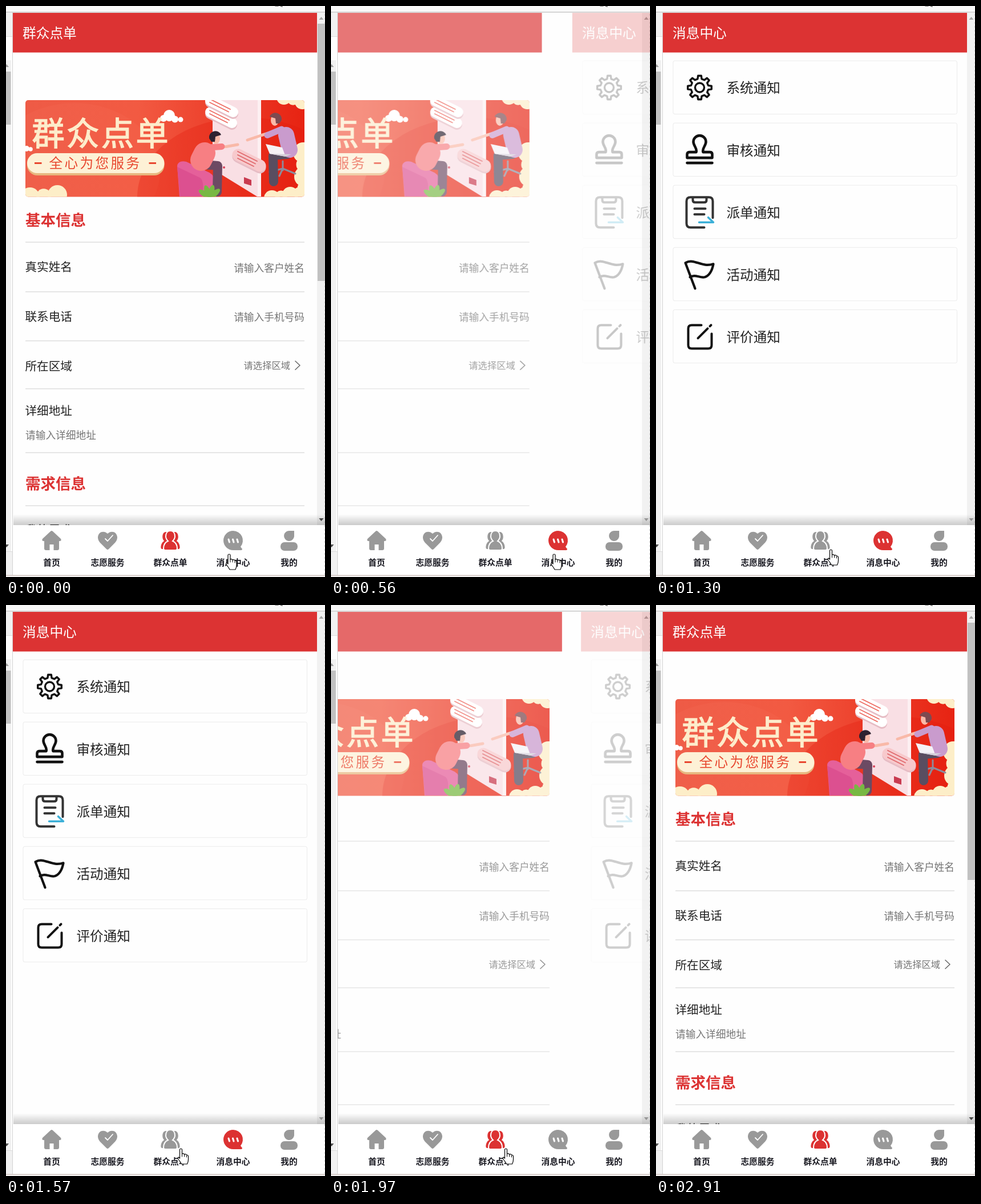
Recreate the animation shown at these times as an HTML page. Size 559 px wide and 1001 px high, loop 3610 ms.

```html
<!DOCTYPE html>
<html lang="zh-CN">
<head>
<meta charset="utf-8">
<title>群众点单</title>
<style>
html, body { margin: 0; width: 100%; height: 100%; overflow: hidden; background: #fff; }
svg { display: block; width: 559px; height: 1001px; font-family: "Noto Sans CJK SC", "Noto Sans CJK", "Noto Sans", sans-serif; }
.line { fill: none; stroke-linecap: round; stroke-linejoin: round; }
.tab { fill: #999; }
.tab.on { fill: #dc3232; }
</style>
</head>
<body>
<svg id="stage" viewBox="0 0 559 1001"></svg>
<script>
const RED = '#dc3333', CREAM = '#fdeec8', SKIN = '#f9b9a8', INK = '#111';

// Text placed by the vertical centre of its glyphs
const text = (x, cy, size, str, fill, extra = '') =>
  `<text x="${x}" y="${(cy + size * .38).toFixed(2)}" font-size="${size}" fill="${fill}" ${extra}>${str}</text>`;
const rect = (x, y, w, h, fill, extra = '') =>
  `<rect x="${x}" y="${y}" width="${w}" height="${h}" fill="${fill}" ${extra}/>`;
const oval = (x, y, rx, ry, fill, extra = '') =>
  `<ellipse cx="${x}" cy="${y}" rx="${rx}" ry="${ry}" fill="${fill}" ${extra}/>`;
const path = (d, fill = 'inherit', extra = '') => `<path d="${d}" fill="${fill}" ${extra}/>`;
const line = (d, color, width, extra = '') =>
  `<path class="line" d="${d}" stroke="${color}" stroke-width="${width}" ${extra}/>`;
const at = (x, y, body, scale = '1') => `<g transform="translate(${x} ${y}) scale(${scale})">${body}</g>`;
const repeat = (n, fn) => Array.from({ length: n }, (_, i) => fn(i)).join('');
const header = title => rect(12, 12, 533, 69.5, RED) + text(29, 47, 23.7, title, '#fff');

// A row of n puffs from (x, y), each stepping by (dx, dy)
const cloud = (x, y, n, dx, dy, r, fill = CREAM) =>
  repeat(n, i => oval(x + i * dx, y + i * dy, r - i % 2 * r / 4, r - i % 2 * r / 4, fill));

// Slanted speech bubble with lines of writing
const bubble = (x, y, len, width, fill, ink, rows) =>
  line(`M${x} ${y + 3}l${len} ${len / 2}`, '#e6bcc4', width) +
  line(`M${x} ${y}l${len} ${len / 2}`, fill, width) +
  repeat(rows, i => line(`M${x - 1} ${y + (i - (rows - 1) / 2) * 6}l${len - 4 - i * 3} ${(len - 4 - i * 3) / 2}`, ink, 1.8));

// Seated figure facing right, origin at the head; (hx, hy) is the reaching hand
const figure = (hx, hy, girth, drop, shirt, legs, hair) =>
  line(`M-20 ${44 + drop}L5 ${46 + drop}L4 ${92 + drop}`, legs, 16) +
  line(`M-18 28L-24 ${36 + drop}`, shirt, girth) +
  line(`M-10 18L${hx / 2} ${hy / 2 + 10}L${hx} ${hy}`, SKIN, 5) +
  line(`M-10 18L${hx * .3} ${hy / 2 + 10}`, shirt, 11) +
  oval(2, 2, 7, 10, SKIN) + path('M-10 2A11 11 0 0 1 11-4L1-1 0 8-6 8Z', hair);

const wall = path('M362 165H447V334H440L362 286Z', '#f9dfe4') + rect(441, 165, 6, 169, '#fdf0f2') +
  bubble(358, 186, 38, 18, '#fff', '#ee6a60', 2) + bubble(358, 166, 40, 18, '#fff', '#ee6a60', 2) +
  bubble(407, 261, 38, 21, '#f7c9cc', '#e0676b', 3) +
  path('M417 300l13 5v10l-13-4Z', '#c93b50') + repeat(3, i => oval(372 + i * 5, 279 + i * 2, 2, 2, '#d9435a'));

const chair = path('M300 280Q302 270 316 273L352 290Q364 294 364 304V327L357 334H304Z', '#e5609a') +
  path('M300 282L340 301Q348 306 344 334H305Z', '#dc5090');
const plant = repeat(4, i => oval(0, -10, 5, 13, '#78b843', `transform="translate(357 336) rotate(${i * 35 - 55})"`));
const stool = line('M494 262Q506 262 502 232M485 272V288M462 291L485 285L507 294M485 285L479 298', '#8d8b9a', 3);
const laptop = path('M455 242l29 6 6 16-28-5Z', '#f5f2f6') + path('M462 259l28 5 10-4Z', '#d6d0da');

const banner = `<g clip-path="url(#card)">
  ${rect(34, 165, 489, 170, 'url(#warm)')}
  ${oval(120, 290, 150, 120, '#ff8f70', 'opacity=".08"')}${oval(420, 335, 190, 140, '#e01a0a', 'opacity=".3"')}
  ${cloud(487, 160, 3, 16, 4, 13)}${cloud(521, 257, 4, 1, 21, 18)}${cloud(466, 337, 4, 16, -3, 14)}${cloud(42, 335, 3, 24, -2, 17)}
  ${cloud(276, 197, 4, 10, .7, 6, '#fff')}${oval(286, 192, 10, 10, '#fff')}${cloud(36, 250, 2, 7, 1, 5, '#fff')}
  ${wall}${chair}${at(366, 230, figure(40, 13, 38, 4, '#f77f83', '#6c4a63', '#2e2230'))}${plant}
  ${stool}${at(473, 198, figure(50, 37, 28, 18, '#c99bcd', '#594d60', '#7d4a50'), '-1 1')}${laptop}
  ${text(45.5, 222, 57, '群众点单', '#fdeccb', 'letter-spacing="3.7" stroke="#fdeccb" stroke-width="1.5"')}
  ${rect(37, 260, 240.5, 37, '#e7b77f', 'rx="18"')}${rect(37, 258, 240.5, 35, '#fdf1d6', 'rx="17.5"')}
  ${[50, 250.5].map(x => rect(x, 274, 12.5, 3, '#e8472f')).join('')}
  ${text(75.5, 275, 23.6, '全心为您服务', '#e8472f', 'letter-spacing="3.4"')}
</g>`;

const label = (y, str) => text(33.5, y, 20.6, str, '#222');
const hint = (x, y, size, str, extra) => text(x, y, size, str, '#757575', extra);
const section = (y, str) => text(34, y, 26.5, str, RED, 'font-weight="700"');
const END = 'text-anchor="end"';

const form = header('群众点单') + banner +
  section(375, '基本信息') + section(837, '需求信息') +
  [414, 501, 587, 671, 783, 876].map(y => rect(34, y - .5, 489, 1, '#d0d0d0')).join('') +
  ['真实姓名', '联系电话', '所在区域'].map((name, i) => label(457 + i * 87, name)).join('') +
  hint(523, 459, 17.7, '请输入客户姓名', END) + hint(523, 545, 17.7, '请输入手机号码', END) +
  hint(498, 630, 16.3, '请选择区域', END) + line('M507 622.5l8 7.5-8 7.5', '#666', 1.5) +
  label(709.5, '详细地址') + hint(34, 752, 17.7, '请输入详细地址') +
  label(918, '我的需求');

// Eight teeth, four corners each
const gear = 'M' + Array.from({ length: 32 }, (_, i) => {
  const a = (Math.floor(i / 4) + [-.3, -.17, .17, .3][i % 4]) * Math.PI / 4;
  const r = i % 4 % 3 ? 21 : 15.5;
  return `${(r * Math.sin(a)).toFixed(1)} ${(-r * Math.cos(a)).toFixed(1)}`;
}).join('L') + 'Z';

const notices = {
  系统通知: line(gear + 'M8 0A8 8 0 1 1-8 0A8 8 0 1 1 8 0', INK, 3.4),
  审核通知: line('M-6 4C-4-3-11-7-11-14A11 11 0 0 1 11-14C11-7 4-3 6 4H18Q22 4 22 8V14H-22V8Q-22 4-18 4ZM-22 23H22', INK, 4.6),
  派单通知: line('M23 10V-19Q23-26 16-26H-16Q-23-26-23-19V20Q-23 27-16 27H8M-12-26V-21Q-12-17-8-17H8Q12-17 12-21V-26M-9-6H10M-9 4H8', '#333', 4) +
    line('M-1 18H24L15 9.5', '#3cb0d8', 3.5),
  活动通知: line('M-8 25L-25-20C-9-29 3-11 24-18C22-7 17 2 9 5C0 7-8-1-17 5', INK, 4.2),
  评价通知: line('M3-20H-14Q-20-20-20-14V15Q-20 21-14 21H15Q21 21 21 15V-5M-3 3L14-14M18-18L20-20', INK, 4)
};
const inbox = header('消息中心') + Object.entries(notices).map(([name, icon], i) =>
  at(30, 96 + 109.1 * i, rect(0, 0, 497.5, 93.5, '#fff', 'fill-opacity=".5" stroke="#ebebeb" rx="3"') +
    at(46.5, 47, icon) + text(93.5, 47.5, 23.6, name, '#222'))).join('');

// Tab icons, centred on (0, 0)
const person = 'M0-17C5-17 8-13 8-7 8-3 6-1 4 1 9 3 12 8 12 14Q12 17 9 17H-9Q-12 17-12 14C-12 8-9 3-4 1-6-1-8-3-8-7-8-13-5-17 0-17Z';
const icons = {
  首页: path('M-2-16Q0-18 2-16L16-3Q18 1 14 1H13V14Q13 17 10 17H-10Q-13 17-13 14V1H-14Q-18 1-16-3Z') + rect(-3.5, 7, 7, 11, '#fff'),
  志愿服务: path('M0-12C6-18 16-16 17-6 17 0 14 3 10 7L2 15Q0 17-2 15L-10 7C-14 3-17 0-17-6-16-16-6-18 0-12Z') + line('M-4-3L0 1L9-9', '#fff', 1.8),
  群众点单: [-8, 8].map(x => at(x, 0, path(person), '.72 .88')).join('') + path(person, 'inherit', 'stroke="#fff" stroke-width="2"'),
  消息中心: path('M0-17A17 17 0 0 1 13 11L16 15Q16 17 13 17H0A17 17 0 0 1 0-17Z') +
    repeat(3, i => line(`M${i * 7.5 - 8} -2l1.500 5`, '#fff', 3)),
  我的: path('M1-17H9V-7A9 9 0 1 1 1-17Z') + rect(-15, 3, 30, 15, 'inherit', 'rx="7"')
};
const tabX = [80, 178, 288, 398, 496];
const tabs = Object.entries(icons).map(([name, icon], i) =>
  at(tabX[i], 937, `<g class="tab">${icon}</g>` + text(0, 38, 14.8, name, '#1a1a22', 'font-weight="700" text-anchor="middle"'))).join('');

const tip = (x, y, fill, dir) => path(`M${x - 4} ${y}h8l-4 ${dir * 5}Z`, fill);
const leftBars = rect(0, 0, 559, 11, '#f9f9f9') + rect(0, 10, 559, 1.5, '#c9c9c9') +
  line('M472 0h5m4 0l3 1', '#666', 1.5) +
  rect(0, 12, 11, 41, '#f1f1f1') + rect(0, 53, 11, 1, '#dcdcdc') +
  rect(0, 95, 9, 861, '#f1f1f1') + rect(0, 115, 8.5, 93, '#c1c1c1') +
  tip(1, 107, '#a0a0a0', -1) + tip(1, 944, '#505050', 1) +
  rect(0, 956, 11, 42, '#f1f1f1') + rect(0, 956, 11, 1, '#dcdcdc') + rect(11, 11, 1, 987, '#d2d2d2');
const rightBar = rect(545, 12, 14, 898, '#f1f1f1') +
  line('M558.5 14V997', '#d0d0d0', 1, 'stroke-dasharray="3 4" style="stroke-linecap:butt"') +
  tip(552.5, 24, '#a8a8a8', -1) + tip(552.5, 898, '#a8a8a8', 1) +
  `<g id="thumb">${rect(546, 31, 13, 451, '#c1c1c1') + tip(552.5, 898, '#505050', 1)}</g>`;

const stage = document.getElementById('stage');
stage.innerHTML = `
<defs>
  <linearGradient id="warm"><stop stop-color="#ee5b46"/><stop offset=".4" stop-color="#f25a42"/><stop offset="1" stop-color="#e72312"/></linearGradient>
  <linearGradient id="shade" x2="0" y2="1"><stop stop-opacity="0"/><stop offset="1" stop-opacity=".2"/></linearGradient>
  <clipPath id="card">${rect(34, 165, 489, 169.5, INK, 'rx="5"')}</clipPath>
  <clipPath id="view">${rect(12, 12, 547, 898, INK)}</clipPath>
</defs>
${rect(0, 0, 559, 1001, '#fefefe')}${leftBars}${rightBar}
<g clip-path="url(#view)"><g id="form">${form}</g><g id="inbox">${inbox}</g></g>
${rect(13, 891, 546, 19, 'url(#shade)')}${rect(12, 910, 546, 87, '#fff')}${tabs}
${rect(0, 997.5, 559, 1.5, '#cfc3bf')}${rect(0, 999, 559, 2, '#f6f4f3')}
<g id="pointer" stroke="#000" stroke-width="1.2" stroke-linejoin="round">
  <g id="hand">${path('M-2 2A2 2 0 0 1 2 2V9Q5 8 6 10Q9 9 10 11Q13 11 13 14V19Q13 23 11 27H1Q-1 23-5 18Q-6 15-4 15L-2 17Z', '#fff')}${line('M2 9v5m4-4v4m4-2v3', '#000', 1)}</g>
  <g id="arrow">${path('M0 0V17L4 13.5 7 20 9.5 19 6.5 12.5H12Z', '#fff')}</g>
</g>`;

const LOOP = 3610, WIDTH = 533, SLIDE = 340;
const OPEN = 490, BACK = 1770;
const [formEl, inboxEl, thumb, pointer, hand, arrow] =
  ['form', 'inbox', 'thumb', 'pointer', 'hand', 'arrow'].map(id => document.getElementById(id));
const tabEls = stage.querySelectorAll('.tab');

const clamp = x => Math.min(1, Math.max(0, x));
const mix = (a, b, p) => a + (b - a) * p;
const smooth = p => p * p * (3 - 2 * p);

// cubic-bezier(.25, .1, .25, 1), solved by bisection
function ease(x) {
  const curve = (a, b, u) => 3 * a * u * (1 - u) ** 2 + 3 * b * u * u * (1 - u) + u ** 3;
  let lo = 0, hi = 1;
  for (let i = 0; i < 24; i++) {
    const mid = (lo + hi) / 2;
    if (curve(.25, .25, mid) < x) lo = mid; else hi = mid;
  }
  return curve(.1, 1, lo);
}

function place(el, away, dir) {
  el.setAttribute('transform', `translate(${(dir * away * WIDTH).toFixed(2)} 0)`);
  el.setAttribute('opacity', (1 - away).toFixed(3));
}
const show = (el, on) => el.style.display = on ? '' : 'none';

function draw(t) {
  // The entering page starts slightly after the leaving one
  const slide = start => ease(clamp((t - start) / SLIDE));
  const back = t >= BACK;
  const formAway = back ? 1 - slide(BACK + 51) : slide(OPEN - 2);
  place(formEl, formAway, -1);
  place(inboxEl, back ? slide(BACK + 32) : 1 - slide(OPEN + 13), 1);

  const onInbox = t >= OPEN && !back;
  tabEls[2].classList.toggle('on', !onInbox);
  tabEls[3].classList.toggle('on', onInbox);
  show(thumb, !onInbox && formAway < .001);

  const across = smooth(clamp((t - 1050) / 250)), exit = clamp((t - 2660) / 250);
  const x = mix(mix(391, 306.5, across), -20, exit);
  const y = mix(mix(961, 953, across) - 16 * Math.sin(Math.PI * across), 560, exit);
  pointer.setAttribute('transform', `translate(${x.toFixed(2)} ${y.toFixed(2)})`);
  show(hand, y > 910);
  show(arrow, y <= 910);
}

const begin = performance.now();
function loop() {
  draw((performance.now() - begin) % LOOP);
  requestAnimationFrame(loop);
}
loop();
</script>
</body>
</html>
```
